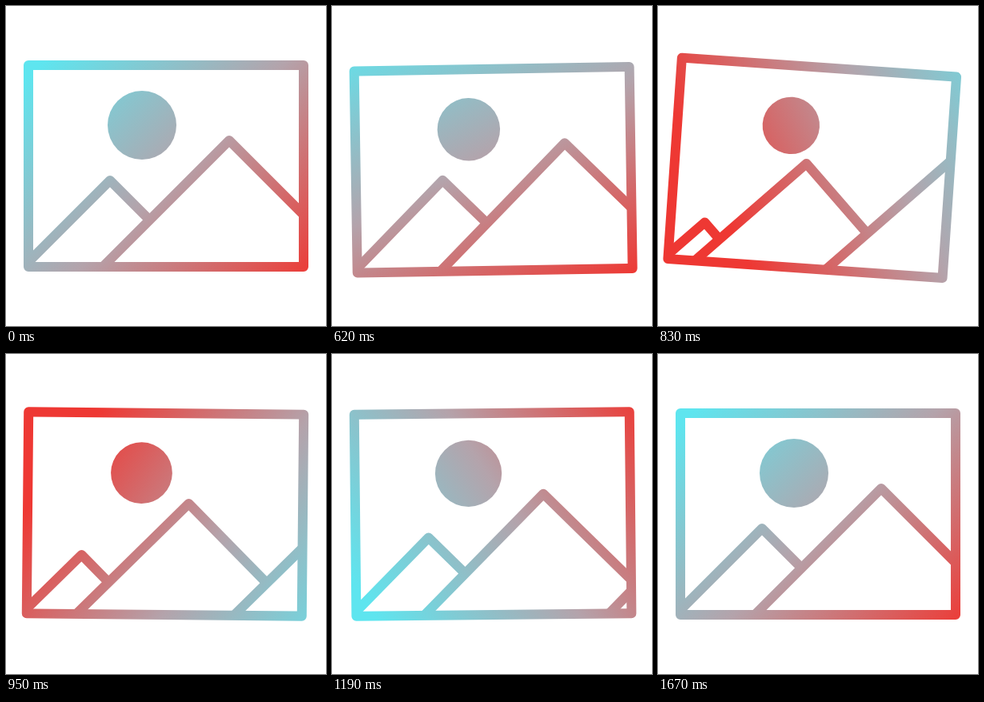
Animation, 400 px wide and 400 px high, one loop 1700 ms. Source, as an HTML page with a canvas:

```html
<!DOCTYPE html>
<html lang="en">
<head>
<meta charset="utf-8">
<title>Swinging picture icon</title>
<style>
  html, body { margin: 0; width: 100%; height: 100%; overflow: hidden; background: #fff; }
  canvas { display: block; width: 100%; height: 100%; }
</style>
</head>
<body>
<canvas id="stage" width="400" height="400"></canvas>
<script>
const ctx = document.getElementById('stage').getContext('2d');
const LOOP = 1700, HOLD = 500, STEP = 30;
const START = 470, END = 1670, SUN_SMALLEST = 790;
const PIVOT = { x: 200, y: 95 };
// Turning points of the swing: [ms, degrees]
const SWINGS = [[START, 0], [570, -2], [760, 4.7], [1086, -1.9], [1308, 1], [END, 0]];

const progress = (t, from, to) => Math.min(1, Math.max(0, (t - from) / (to - from)));
const mix = (a, b, u) => a + (b - a) * u;
const easeSine = u => (1 - Math.cos(Math.PI * u)) / 2;
const easeOut = u => 1 - (1 - u) ** 3;
const bump = u => Math.sin(Math.PI * u) ** 2;

// Like CSS cubic-bezier(x1, 0, x2, 1)
function bezierEase(x1, x2) {
  return u => {
    let low = 0, high = 1;
    for (let i = 0; i < 30; i++) {
      const s = (low + high) / 2, r = 1 - s;
      if (3 * x1 * s * r * r + 3 * x2 * s * s * r + s ** 3 < u) low = s; else high = s;
    }
    return low * low * (3 - 2 * low);
  };
}
const easeSlide = bezierEase(.41, .13);
const easeRise = bezierEase(.2, .33);
const easeTurn = bezierEase(.33, .44);

function tilt(t) {
  const i = SWINGS.findIndex(([time]) => time > t);
  if (i < 1) return 0;
  const [t0, a] = SWINGS[i - 1], [t1, b] = SWINGS[i];
  return mix(a, b, easeSine(progress(t, t0, t1))) * Math.PI / 180;
}

function sunRadius(t) {
  return t < SUN_SMALLEST
    ? mix(43, 34.6, easeSine(progress(t, START, SUN_SMALLEST)))
    : mix(34.6, 43, easeOut(progress(t, SUN_SMALLEST, END)));
}

// Turns once around while its red end briefly spreads
function makeGradient(t) {
  const angle = Math.PI / 4 + 2 * Math.PI * easeTurn(progress(t, START, END));
  const dx = 215 * Math.cos(angle), dy = 215 * Math.sin(angle);
  const spread = .32 * bump(progress(t, START, 1214));
  const x = 224 - dx * spread, y = 196 - dy * spread;
  const gradient = ctx.createLinearGradient(x - dx, y - dy, x + dx, y + dy);
  gradient.addColorStop(0, '#5ee5ef');
  gradient.addColorStop(.5, '#b4a3ab');
  gradient.addColorStop(1, '#ee3833');
  return gradient;
}

function mountain(x, y) {
  const height = 350 - y;
  ctx.beginPath();
  ctx.moveTo(x - height, 350);
  ctx.lineTo(x, y);
  ctx.lineTo(x + height, 350);
  ctx.fillStyle = '#fff';
  ctx.fill();
  ctx.stroke();
}

function draw(t) {
  const u = progress(t, START, END), slide = easeSlide(u), paint = makeGradient(t);
  ctx.clearRect(0, 0, 400, 400);
  ctx.save();
  ctx.translate(PIVOT.x, PIVOT.y + 6.5 * bump(progress(t, START, 930)));
  ctx.rotate(tilt(t));
  ctx.translate(-PIVOT.x, -PIVOT.y);
  ctx.lineWidth = 12;
  ctx.lineJoin = 'round';
  ctx.strokeStyle = paint;

  // Each mountain takes the place of the one to its right
  ctx.save();
  ctx.beginPath();
  ctx.rect(28, 74, 344, 252);
  ctx.clip();
  mountain(mix(28, 130, slide), mix(320, 218, slide));
  mountain(mix(130, 279, slide), mix(218, 168, easeRise(u)));
  mountain(mix(279, 528, slide), 168);
  ctx.restore();

  ctx.fillStyle = paint;
  ctx.beginPath();
  ctx.arc(170, 149, sunRadius(t), 0, 2 * Math.PI);
  ctx.fill();
  ctx.strokeRect(28, 74, 344, 252);
  ctx.restore();
}

function tick() {
  const t = performance.now() % LOOP;
  draw(t < HOLD ? 0 : HOLD + STEP * Math.floor((t - HOLD) / STEP));
  requestAnimationFrame(tick);
}
tick();
</script>
</body>
</html>
```
